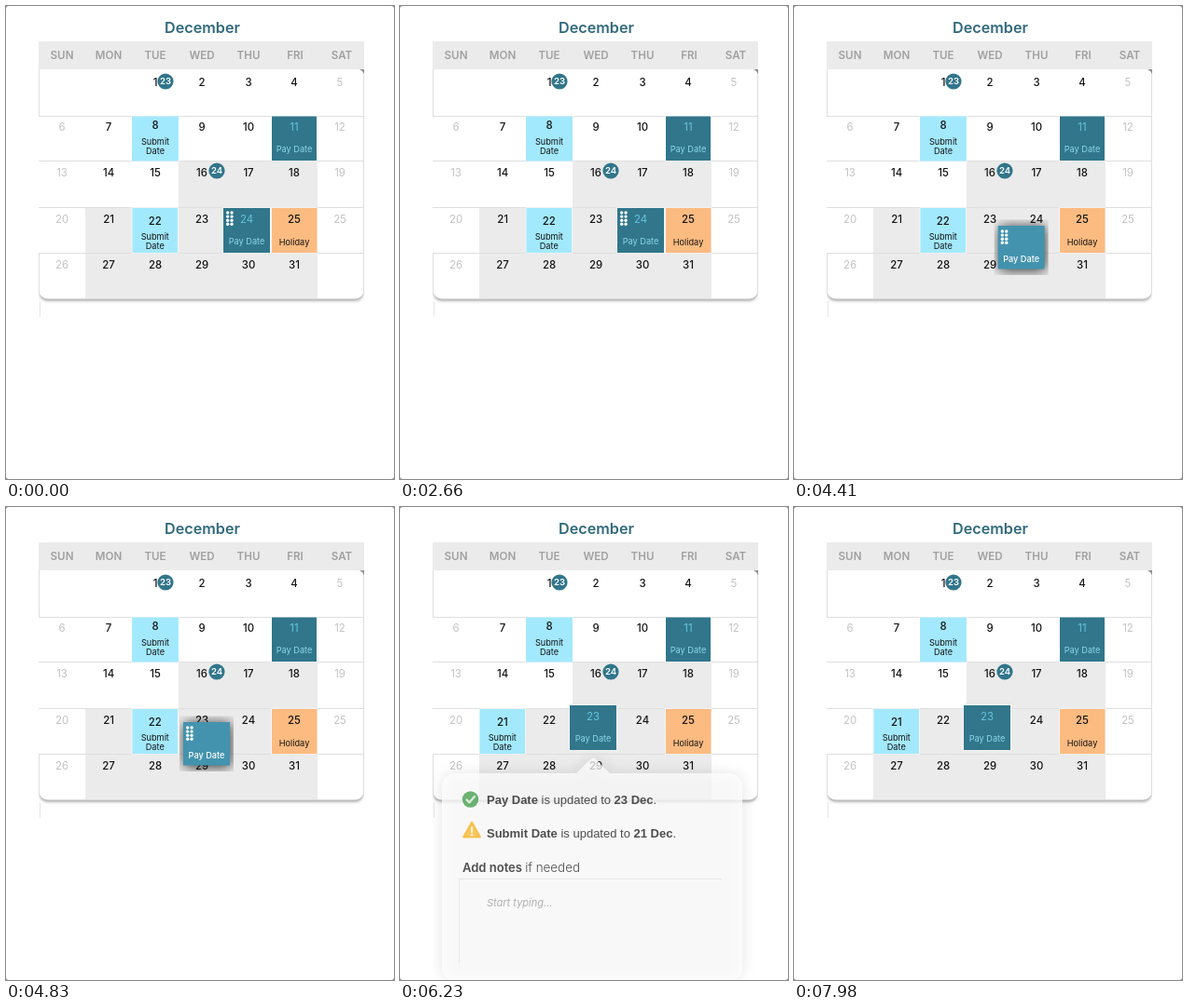
Animation, 416 px wide and 508 px high, one loop 8.12 s. Source, as an HTML page with a canvas:

```html
<!DOCTYPE html>
<html lang="en">
<head>
<meta charset="utf-8">
<title>Calendar</title>
<style>
  html, body { margin: 0; width: 100%; height: 100%; overflow: hidden; background: #fff; }
  canvas { display: block; width: 416px; height: 508px; }
</style>
</head>
<body>
<canvas id="stage"></canvas>
<script>
const W = 416, H = 508, LOOP = 8120, TICK = 70;
const LIFT = 3920, DROP = 5950, SWAP = 6020;
const TEAL = '#31768b', AQUA = '#66c4dc', INK = '#141414', PALE = '#c2c2c2', GREY = '#ebebeb';
const SANS = 'Inter, sans-serif', ARIAL = '"Liberation Sans", Arial, sans-serif';

const canvas = document.getElementById('stage');
const ctx = canvas.getContext('2d');
const dpr = window.devicePixelRatio || 1;
canvas.width = W * dpr;
canvas.height = H * dpr;

// Drag path of the card: time, x, y
const path = [
  [3920, 233, 219], [4060, 234, 226], [4270, 228, 234], [4480, 214, 237],
  [4690, 198, 235], [4830, 190, 231], [5110, 187, 225], [5460, 186, 219], [5740, 186, 218]
];

const clamp = v => Math.max(0, Math.min(1, v));
const ease = v => { v = clamp(v); return v * v * (3 - 2 * v); };

function along(t) {
  let i = 1;
  while (i < path.length - 1 && path[i][0] < t) i++;
  const [t0, x0, y0] = path[i - 1], [t1, x1, y1] = path[i];
  const k = clamp((t - t0) / (t1 - t0));
  return [x0 + (x1 - x0) * k, y0 + (y1 - y0) * k];
}

function rect(x, y, w, h, color) {
  ctx.fillStyle = color;
  ctx.fillRect(x, y, w, h);
}

function clipTo(x, y, w, h) {
  ctx.beginPath();
  ctx.rect(x, y, w, h);
  ctx.clip();
}

function disc(x, y, r, color) {
  ctx.fillStyle = color;
  ctx.beginPath();
  ctx.arc(x, y, r, 0, Math.PI * 2);
  ctx.fill();
}

function stroke(points, color, width) {
  ctx.strokeStyle = color;
  ctx.lineWidth = width;
  ctx.lineCap = ctx.lineJoin = 'round';
  ctx.beginPath();
  points.forEach(([x, y]) => ctx.lineTo(x, y));
  ctx.stroke();
}

function text(s, x, y, font, color, align = 'left') {
  ctx.font = font;
  ctx.fillStyle = color;
  ctx.textAlign = align;
  ctx.fillText(s, x, y);
  return x + ctx.measureText(s).width;
}

// Centred text whose y is the middle of the digits or capitals
function label(s, x, y, size, color, weight = 400) {
  text(s, x, y + size * 0.364, `${weight} ${size}px ${SANS}`, color, 'center');
}

const weightOf = color => color === INK ? 500 : 400;
const day = (n, x, y, color = INK) => label(n, x, y, 11.4, color, weightOf(color));
const small = (s, x, y, color = INK, weight = 400) => label(s, x, y, 9.2, color, weight);

function cell(x, y, w, h, color) {
  rect(x - 1, y - 1, w + 2, h + 2, 'rgba(255,255,255,.5)');
  rect(x, y, w, h, color);
}

function submitCell(n, x, y, w, dy) {
  const mid = x + w / 2;
  cell(x, y, w, 48, '#a3e9fd');
  day(n, mid, y + dy);
  small('Submit', mid, y + dy + 17.5);
  small('Date', mid, y + dy + 27.5);
}

function payCell(n, x, y, w, h) {
  cell(x, y, w, h, TEAL);
  day(n, x + w / 2, y + 11.5, AQUA);
  small('Pay Date', x + w / 2, y + h - 12.3, '#8cd6e8');
}

function grip(x, y) {
  for (let i = 0; i < 8; i++) disc(x + 4.7 + i % 2 * 4.4, y + 6 + (i >> 1) * 4.1, 1.7, '#fff');
}

function badge(n, x, y) {
  disc(x, y, 8.6, TEAL);
  label(n, x, y, 9.6, '#fff', 600);
}

function calendarFrame() {
  ctx.save();
  clipTo(35, 300, 349, 30);
  ctx.shadowColor = 'rgba(0,0,0,.3)';
  ctx.shadowBlur = 3 * dpr;
  ctx.shadowOffsetY = 2.5 * dpr;
  ctx.fillStyle = '#fff';
  ctx.beginPath();
  ctx.roundRect(35.5, 280, 348, 34.5, [0, 0, 9, 9]);
  ctx.fill();
  ctx.restore();
  rect(36, 317, 1, 17, '#e6e6e6');

  rect(35, 38, 349, 30, GREY);
  label('December', 210.5, 23, 16.2, '#316a7c', 600);
  ['SUN', 'MON', 'TUE', 'WED', 'THU', 'FRI', 'SAT'].forEach((d, i) =>
    label(d, 60 + i * 50, 53, 11.6, '#a0a0a0', 600));

  rect(185, 167, 149, 49, GREY);
  rect(85, 217, 249, 48, GREY);
  rect(85, 265, 249, 49, GREY);
  for (const y of [118, 166, 216, 265]) rect(35, y, 349, 1, '#dfdfdf');
  rect(35, 68, 1, 50, '#dedede');
  rect(35, 265, 1, 42, '#dedede');
  rect(383, 68, 1, 240, '#dedede');
  ctx.fillStyle = '#8e8e8e';
  ctx.beginPath();
  ctx.moveTo(379, 68);
  ctx.lineTo(384, 68);
  ctx.lineTo(384, 73);
  ctx.lineTo(382, 70);
  ctx.fill();
}

// Plain day numbers; coloured cells are painted over them
function days() {
  const rows = [[81.7, -1], [130, 6], [178.5, 13], [228.7, 20], [277.7, 26]];
  rows.forEach(([y, first], r) => {
    for (let c = 0; c < 7; c++) {
      let n = first + c;
      if (r === 3 && c === 6) n = 25;
      if (n < 1 || n > 31) continue;
      const outside = c === 0 || c === 6;
      day(n, 60 + c * 50 - (c > 4 ? 1 : 0) - (c > 5 ? 1 : 0), y, outside ? PALE : INK);
    }
  });
}

function dragged(x, y) {
  ctx.save();
  clipTo(x - 4, y - 6.5, 58, 59.5);
  ctx.shadowColor = 'rgba(0,0,0,.8)';
  ctx.shadowBlur = 13 * dpr;
  ctx.shadowOffsetX = 1 * dpr;
  ctx.shadowOffsetY = 1 * dpr;
  rect(x, y, 50, 46.5, '#4393ae');
  ctx.restore();
  grip(x, y);
  small('Pay Date', x + 25, y + 35.5, '#fff', 500);
}

function noteLine(kind, date, y) {
  const bold = `700 13px ${ARIAL}`, plain = `13px ${ARIAL}`;
  let x = text(kind, 93, y, bold, '#111');
  x = text(' is updated to ', x, y, plain, '#111');
  x = text(date, x, y, bold, '#111');
  text('.', x, y, plain, '#111');
}

function popupShape() {
  ctx.beginPath();
  ctx.moveTo(59, 286);
  ctx.lineTo(189, 286);
  ctx.lineTo(204, 271);
  ctx.quadraticCurveTo(207, 268, 210, 271);
  ctx.lineTo(225, 286);
  ctx.arcTo(367, 286, 367, 300, 14);
  ctx.arcTo(367, 509, 353, 509, 14);
  ctx.arcTo(45, 509, 45, 495, 14);
  ctx.arcTo(45, 286, 59, 286, 14);
  ctx.closePath();
}

function popup(alpha) {
  ctx.save();
  ctx.globalAlpha = alpha;
  ctx.save();
  clipTo(35, 260, 349, 248);
  ctx.shadowColor = `rgba(0,0,0,${0.2 * alpha})`;
  ctx.shadowBlur = 16 * dpr;
  ctx.fillStyle = '#fff';
  popupShape();
  ctx.fill();
  ctx.restore();

  disc(75.5, 314, 8.7, '#3c9a42');
  stroke([[71.5, 314.5], [74.5, 317.3], [79.8, 311]], '#fff', 2.4);

  const warn = [[77, 338.5], [86, 354.5], [68, 354.5], [77, 338.5]];
  stroke(warn, '#f8b62d', 2);
  ctx.fillStyle = '#f8b62d';
  ctx.fill();
  stroke([[77, 344], [77, 349]], '#fff', 2);
  disc(77, 352.3, 1.2, '#fff');

  noteLine('Pay Date', '23 Dec', 319);
  noteLine('Submit Date', '21 Dec', 355);
  const x = text('Add notes ', 67, 392, `600 13px ${SANS}`, '#111');
  text('if needed', x, 392, `300 13.4px ${SANS}`, '#111');
  rect(63, 399, 282, 1, '#e2e2e2');
  rect(63, 399, 1, 91, '#e2e2e2');
  text('Start typing...', 93, 429, `italic 11px ${SANS}`, '#969696');
  ctx.restore();
}

function draw(t) {
  ctx.setTransform(dpr, 0, 0, dpr, 0, 0);
  rect(0, 0, W, H, '#8a8a8a');
  ctx.fillStyle = '#fff';
  ctx.beginPath();
  ctx.roundRect(0, 0, W, H, 3);
  ctx.fill();

  calendarFrame();
  days();
  badge('23', 171, 81);
  badge('24', 226, 177);
  submitCell('8', 135, 118.5, 50, 9.5);
  payCell('11', 285, 118.5, 48, 47.5);
  cell(285, 217, 48.5, 48, '#fcbb81');
  day('25', 309, 228.7);
  small('Holiday', 309, 253.5);

  if (t < SWAP) submitCell('22', 135.5, 217, 48.5, 13.5);
  else submitCell('21', 85.5, 217, 48.5, 13.5);

  if (t < LIFT) {
    payCell('24', 233, 217, 50, 48);
    grip(233, 216);
  } else if (t < DROP) {
    dragged(...along(t));
  } else {
    payCell('23', 182, 213, 50, 48);
  }

  const shown = ease((t - 6090) / 210) * (1 - ease((t - 7350) / 210));
  if (shown > 0) popup(shown);
}

function tick(now) {
  draw(Math.floor(now % LOOP / TICK) * TICK);
  requestAnimationFrame(tick);
}
requestAnimationFrame(tick);
</script>
</body>
</html>
```
